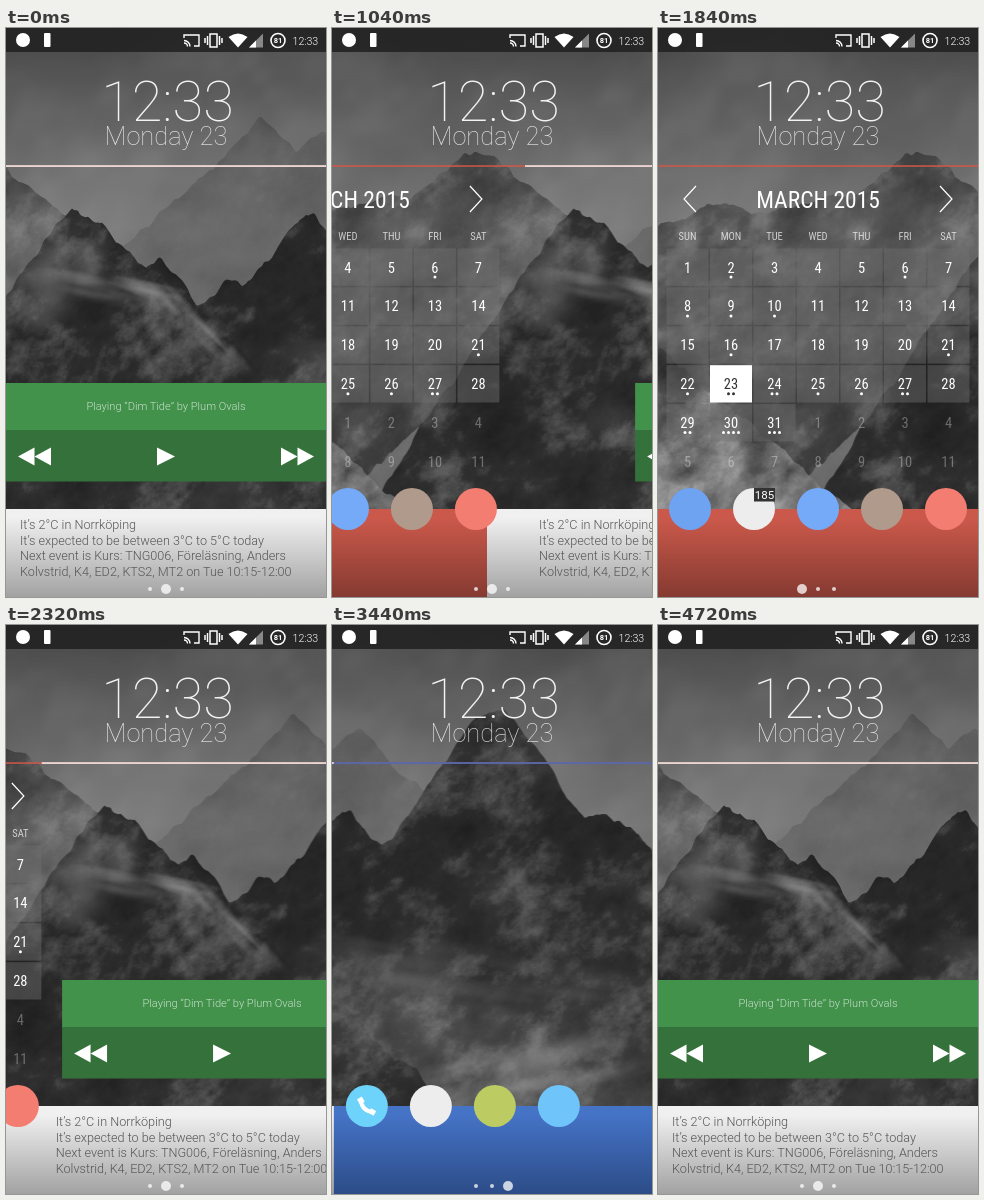
Animation of 320 by 569 pixels, one loop 4.8 s. Source, as an HTML page with a canvas:

```html
<!DOCTYPE html>
<html lang="en">
<head>
<meta charset="utf-8">
<title>Home screen</title>
<style>
  html, body { margin: 0; width: 100%; height: 100%; overflow: hidden; background: #333; }
  #stage { position: relative; width: 320px; height: 569px; overflow: hidden; }
  #wall, svg { position: absolute; top: 0; left: 0; }
  #wall { left: -300px; }
  svg { font-family: Roboto, sans-serif; fill: #fff; }
  .mid { text-anchor: middle; }
  .thin { font-weight: 100; }
  .light { font-weight: 300; }
  .narrow { font-family: "Roboto Condensed", Roboto, sans-serif; font-stretch: 75%; }
  .line { fill: none; stroke: #fff; }
</style>
</head>
<body>
<div id="stage">
  <canvas id="wall" width="960" height="569"></canvas>
  <svg id="ui" width="320" height="569" viewBox="0 0 320 569"></svg>
</div>
<script>
const LOOP = 4800, PAGE = 320;
const $ = id => document.getElementById(id);

// ---- wallpaper ----
const W = 960, H = 569, LEFT = -300;
let seed = 7;
const rnd = () => (seed = seed * 16807 % 2147483647) / 2147483647;
const gray = (v, a = 1) => `rgba(${v},${v},${v},${a})`;
const lattice = Float32Array.from({ length: 65536 }, rnd);

function noise(x, y) {
  const ix = Math.floor(x), iy = Math.floor(y);
  const ease = f => f * f * (3 - 2 * f);
  const u = ease(x - ix), v = ease(y - iy);
  const at = (i, j) => lattice[(iy + j & 255) << 8 | ix + i & 255];
  const top = at(0, 0) + (at(1, 0) - at(0, 0)) * u;
  const low = at(0, 1) + (at(1, 1) - at(0, 1)) * u;
  return top + (low - top) * v;
}

// Fractal noise, centred on zero.
function fractal(x, y, octaves) {
  let sum = 0, amp = .5;
  for (let i = 0; i < octaves; i++, amp *= .62) {
    sum += (noise(x, y) - .5) * amp;
    x *= 2; y *= 2;
  }
  return sum;
}

// Lightens where the noise is positive and darkens where it is negative.
function texture(size, octaves, gain) {
  const canvas = document.createElement('canvas');
  canvas.width = W;
  canvas.height = H;
  const c = canvas.getContext('2d'), image = c.createImageData(W, H);
  for (let i = 0; i < W * H; i++) {
    const x = i % W, y = i / W | 0;
    const v = fractal((x + y * .3) / size, y / size, octaves);
    image.data.fill(v > 0 ? 255 : 0, i * 4, i * 4 + 3);
    image.data[i * 4 + 3] = Math.abs(v) * gain;
  }
  c.putImageData(image, 0, 0);
  return canvas;
}

const g = $('wall').getContext('2d');
g.translate(-LEFT, 0);

function fade(y0, y1, ...tones) {
  const f = g.createLinearGradient(0, y0, 0, y1);
  tones.forEach((v, i) => f.addColorStop(i / (tones.length - 1), gray(v)));
  return f;
}

// A loose cluster of soft puffs.
function mist(x, y, w, h, tone, turn = 0) {
  for (let i = 0; i < 24; i++) {
    g.save();
    g.translate(x, y);
    g.rotate(turn);
    g.translate((rnd() - .5) * 2 * w, (rnd() - .5) * 2 * h);
    g.scale(w * (.3 + rnd() * .4), h * (.3 + rnd() * .5));
    const f = g.createRadialGradient(0, 0, 0, 0, 0, 1);
    f.addColorStop(0, gray(tone, .2));
    f.addColorStop(1, gray(tone, 0));
    g.fillStyle = f;
    g.fillRect(-1, -1, 2, 2);
    g.restore();
  }
}

// Each peak is x, y, left slope, right slope and how round its top is.
function ridge(peaks, fill, rock, amount) {
  const path = new Path2D();
  for (let x = LEFT; x <= LEFT + W; x += 2) {
    const heights = peaks.map(([px, py, left, right, round = 6]) =>
      py + (Math.hypot(x - px, round) - round) * (x < px ? left : right));
    path.lineTo(x, Math.min(...heights) + fractal(x / 22, peaks[0][0], 4) * 18);
  }
  path.lineTo(LEFT + W, H);
  path.lineTo(LEFT, H);
  g.save();
  g.clip(path);
  g.fillStyle = fill;
  g.fillRect(LEFT, 0, W, H);
  g.globalAlpha = amount;
  g.drawImage(rock, LEFT, 0);
  g.restore();
}

function paintWall() {
  const rock = texture(34, 6, 300), cloud = texture(130, 4, 130);
  g.fillStyle = fade(0, 300, 74, 98, 124, 118);
  g.fillRect(LEFT, 0, W, H);

  ridge([[-28, 124, .75, .75], [-110, 165, .4, .6], [-230, 178, .3, .3]], fade(120, 420, 74, 92, 66), rock, .5);
  ridge([[255, 89, 1.3, 1.3], [220, 130, .9, 1], [315, 109, 1, 1]], fade(90, 290, 78, 104, 112), rock, .15);
  mist(150, 225, 110, 40, 128);
  mist(-60, 215, 90, 40, 108);

  ridge([[302, 190, 1.1, 1], [230, 254, .6, 1], [358, 208, 1, 1], [452, 84, 1.6, 1.6, 25], [550, 190, 1, .6]],
    fade(90, 480, 46, 44, 50, 76), rock, .5);
  mist(430, 350, 130, 20, 92, .15);
  mist(460, 455, 120, 24, 150, -.2);

  ridge([[67, 180, 1.5, .9], [152, 232, 1, 1.2]], fade(180, 480, 42, 46, 50), rock, .55);
  mist(45, 255, 50, 34, 150, -.5);
  mist(105, 260, 60, 12, 165, .2);
  mist(195, 302, 45, 8, 145, .8);

  ridge([[-330, 290, 1, .85]], fade(330, 480, 66, 130), rock, .9);
  g.globalAlpha = .6;
  g.drawImage(cloud, LEFT, 0);
}
paintWall();

// ---- interface ----
const rect = (x, y, w, h, fill, more = '') => `<rect x="${x}" y="${y}" width="${w}" height="${h}" fill="${fill}" ${more}/>`;
const disc = (x, y, r, fill = '#fff', more = '') => `<circle cx="${x}" cy="${y}" r="${r}" fill="${fill}" ${more}/>`;
const text = (s, x, y, size, cls = '', more = '') => `<text x="${x}" y="${y}" font-size="${size}" class="${cls}" ${more}>${s}</text>`;
const path = (d, more = '') => `<path d="${d}" ${more}/>`;
const line = (d, width) => path(d, `class="line" stroke-width="${width}"`);
const group = (id, body) => `<g id="${id}">${body}</g>`;
const shade = (id, top, bottom) => `<linearGradient id="${id}" x2="0" y2="1"><stop offset=".1" stop-color="${top}"/><stop offset="1" stop-color="${bottom}"/></linearGradient>`;
const bar = (id, x = 0) => rect(x, 481, PAGE, 88, `url(#${id})`);
const rule = (color, x = 0) => rect(x, 137.3, PAGE, 1.5, color);
const icons = colors => colors.map((c, i) => disc(32 + 64 * i, 481, 21, c)).join('');
const arrows = (x, w, n) => Array.from({ length: n }, (_, i) => path(`M${x + i * Math.abs(w)} 419.5l${w} 9l${-w} 9z`)).join('');

const eventsPerDay = '0100010111000001000011221120243';

function calendar() {
  let out = text('MARCH 2015', 160, 180, 23.5, 'mid narrow') + line('M38 158l-12 13l12 13M282 158l12 13l-12 13', 1.2);
  'SUN MON TUE WED THU FRI SAT'.split(' ').forEach((d, i) =>
    out += text(d, 29.5 + 43.5 * i, 212, 10.5, 'mid narrow', 'opacity=".72"'));
  for (let i = 0; i < 42; i++) {
    const x = 29.5 + 43.5 * (i % 7), y = 239 + 38.9 * (i / 7 | 0);
    const day = i + 1, inMonth = day <= 31, today = day === 23;
    const ink = today ? '#333' : '#fff';
    if (inMonth) out += rect(x - 21, y - 18.5, 42, 37.3, today ? '#fff' : 'rgba(112,112,112,.45)');
    out += text(inMonth ? day : day - 31, x, y + 5.5, 14.5, 'mid narrow', `fill="${ink}" opacity="${inMonth ? 1 : .32}"`);
    const n = +eventsPerDay[i] || 0;
    for (let k = 0; k < n; k++) out += disc(x + (k - (n - 1) / 2) * 5, y + 10, 1.5, ink);
  }
  return out;
}

const statusBar = rect(0, 0, 320, 24, '#222', 'opacity=".88"')
  + disc(17, 12, 7) + rect(38, 5, 6.5, 14, '#fff', 'rx="1"')
  + line('M178 10V7h15v11h-5M178 12.5a6 6 0 0 1 6 6M178 15a3.5 3.5 0 0 1 3.5 3.5', 1.4)
  + line('M204 6h7v13h-7zM201.5 8v9M213.5 8v9M199 10v5M216 10v5', 1.5)
  + path('M222.5 9Q232 2 241.5 9L232 19.5z')
  + path('M243 19.5h14v-14z', 'opacity=".45"') + path('M243 19.5h7v-7z')
  + disc(272, 12.5, 7, 'none', 'class="line" stroke-width="1.6"')
  + text('81', 272, 15.3, 7.5, 'mid', 'font-weight="700"')
  + text('12:33', 286.5, 16.8, 10.6, 'light');

const notes = ['It’s 2°C in Norrköping', 'It’s expected to be between 3°C to 5°C today',
  'Next event is Kurs: TNG006, Föreläsning, Anders', 'Kolvstrid, K4, ED2, KTS2, MT2 on Tue 10:15-12:00'];
const handset = `<g transform="translate(32 481)">${line('M-6-6Q-5 5 6 6', 4)}${line('M-7.5-8l3 5M8 7.5l-5-3', 5.5)}</g>`;

$('ui').innerHTML = `<defs>${shade('red', '#cb594b', '#853a31')}${shade('white', '#f0f0f0', '#a2a2a2')}${shade('blue', '#4573c6', '#2c4c87')}</defs>`
  + bar('white') + group('redBar', bar('red')) + rule('#d0584b')
  + group('home', rule('#f4f4f4')
    + notes.map((s, i) => text(s, 14, 501 + 15.7 * i, 12.65, 'light', 'fill="#555"')).join(''))
  + group('blueBar', bar('blue', PAGE) + rule('#416cc0', PAGE))
  + group('music', rect(0, 355, 320, 48, '#42924b') + rect(0, 402, 320, 51.5, '#35723b')
    + text('Playing “Dim Tide” by Plum Ovals', 160, 381.5, 11.1, 'mid light', 'opacity=".7"')
    + arrows(28.5, -16.5, 2) + arrows(151, 18, 1) + arrows(275, 16.5, 2))
  + group('left', calendar() + icons(['#6ea3f2', '#ededed', '#75aaf8', '#b09a8c', '#f47d72'])
    + rect(96, 460, 21, 13.5, '#333') + text('185', 106.5, 471, 11.5, 'mid'))
  + group('right', icons(['#6ed3fa', '#ededed', '#bccb62', '#6fc4fa']) + handset)
  + text('12:33', 161.5, 92.6, 56, 'mid thin', 'opacity=".92"')
  + text('Monday 23', 160, 116.6, 25.4, 'mid thin', 'opacity=".8"')
  + [0, 1, 2].map(i => disc(144 + 16 * i, 561, 2, '#fff', `id="dot${i}" opacity=".75"`)).join('')
  + statusBar;

// ---- motion: four swipes, out and back to each side ----
const SWIPE = 700, LAG = 18;
const starts = [802, 1947, 2895, 3855], pages = [0, 1, 0, -1, 0];

function ease(x) {
  const slowing = 1 - (1 - x) ** 2;
  return (1 - Math.cos(Math.PI * slowing)) / 2;
}

function pageAt(t) {
  let offset = 0, current = 0;
  starts.forEach((start, i) => {
    if (t < start) return;
    const p = ease(Math.min(1, (t - start) / SWIPE)), from = pages[i], to = pages[i + 1];
    offset = PAGE * (from + (to - from) * p);
    current = p > .75 ? to : from;
  });
  return { offset, current };
}

const slide = (id, x) => $(id).setAttribute('transform', `translate(${x.toFixed(2)} 0)`);

function draw(now) {
  const t = now % LOOP;
  const { offset, current } = pageAt(t);
  const trailing = pageAt(t - LAG).offset;
  $('wall').style.transform = `translateX(${offset * .91}px)`;
  slide('redBar', (offset - PAGE) * 1.3);
  slide('home', offset);
  slide('blueBar', offset);
  slide('music', offset * 1.57);
  slide('left', trailing - PAGE);
  slide('right', trailing + PAGE);
  for (let i = 0; i < 3; i++) $('dot' + i).setAttribute('r', i === 1 - current ? 5 : 2);
  requestAnimationFrame(draw);
}
requestAnimationFrame(draw);
</script>
</body>
</html>
```
